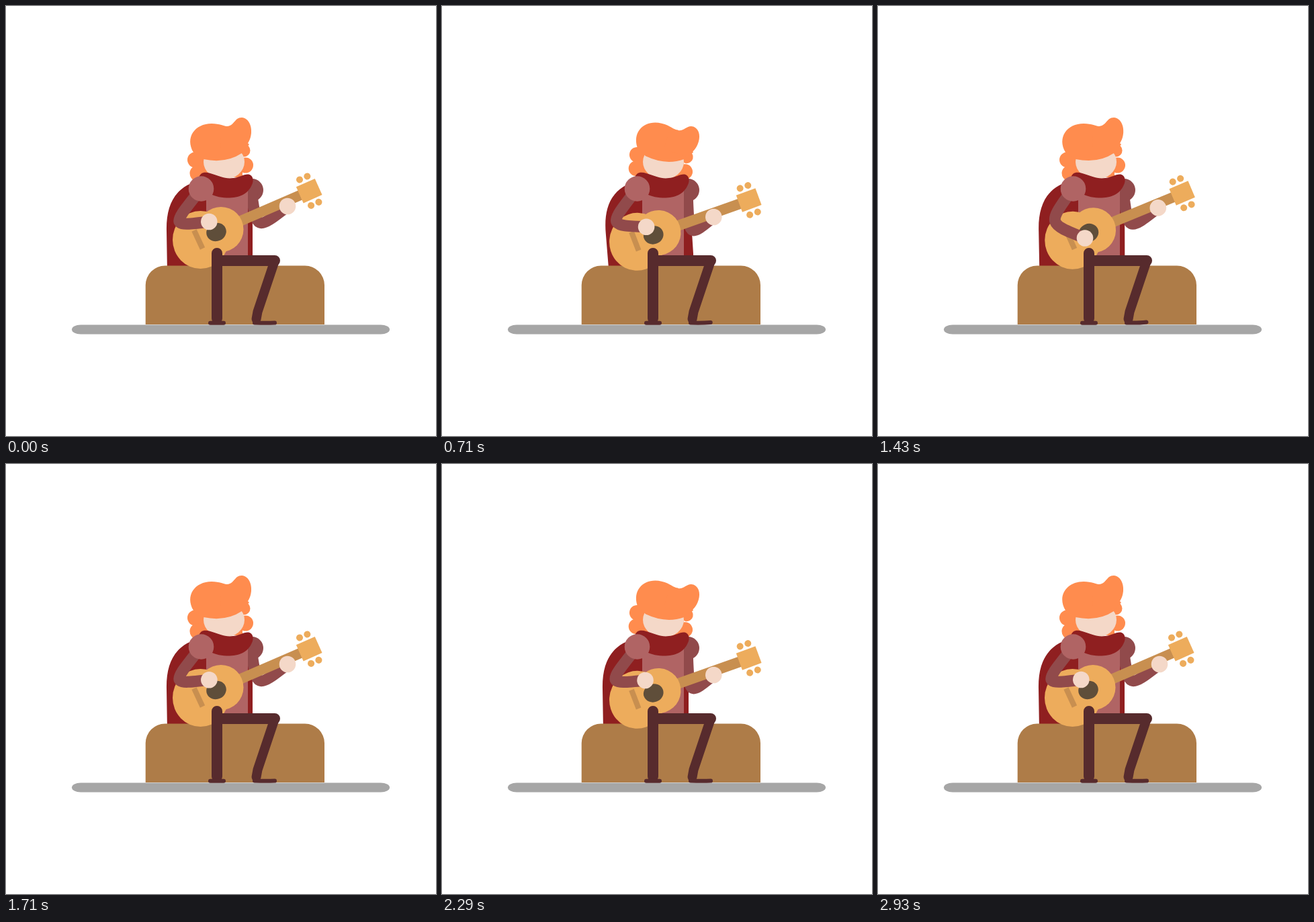
An HTML page that plays this animation: 640 by 640 pixels, repeating every 3 s.

```html
<!DOCTYPE html>
<html lang="en">
<head>
<meta charset="utf-8">
<title>Guitar player</title>
<style>
  html, body { margin: 0; width: 100%; height: 100%; overflow: hidden; background: #fff; }
  svg { display: block; width: 100%; height: 100%; }
  .line { fill: none; stroke-linecap: round; stroke-linejoin: round; }
  .red { fill: #8f1f20; }
  .rose { fill: #b06464; }
  .hair { fill: #ff8c4e; }
  .wood { fill: #edac5c; }
  .skin { fill: #f4d8c8; }
  .sleeve { stroke: #914a4b; stroke-width: 17; }
  .trousers { stroke: #572b2d; }
  .pegs { stroke: #edac5c; stroke-width: 10; stroke-dasharray: 0 12.4; }
  .dark-wood { stroke: #c88f50; fill: none; }
</style>
</head>
<body>
<svg viewBox="0 0 640 640">
  <rect x="98" y="474.5" width="473" height="14" rx="13" ry="7" fill="#a6a6a6"/>

  <path id="cape" class="red" d="M240 396L239 335C238 295 252 267 292 259H355Q367 285 367 330V396Z"/>
  <circle cx="366" cy="274" r="17" fill="#914a4b"/>
  <path id="farArm" class="line sleeve"/>
  <path class="rose" d="M298 262H360V390H298Z"/>
  <path d="M207.700 474V415.500A29 29 0 0 1 236.700 386.500H445A29 29 0 0 1 474 415.500V474Z" fill="#ae7c48"/>

  <g id="curls" class="hair">
    <path d="M285 210H352V255H285Z"/>
    <circle cx="281.500" cy="229" r="11.500"/>
    <circle cx="285" cy="249" r="11.500"/>
    <circle cx="354" cy="215" r="9.500"/>
    <circle cx="356.500" cy="237" r="11.500"/>
  </g>
  <ellipse id="face" class="skin" cx="324.500" cy="232" rx="30.500" ry="26"/>
  <g id="hair" class="hair">
    <path d="M279 218C266 196 281 175 306 175C320 175 325 180 332 179L362 206L351 219Q327 235 294 228Z"/>
    <path id="quiff" d="M318 178C342 184 337 166 351 166C361 167 366 178 365 189C364 200 360 203 356 212H320Z"/>
  </g>
  <path class="red" d="M287 257C288 248 295 246 304 249C317 253 327 258 338 256C349 255 353 250 361 250.500
    C368 252 369 260 366 266C360 281 345 286 328 285.500C308 285 290 275 287 257Z"/>

  <g id="guitar">
    <path class="dark-wood" stroke-width="15.500" d="M335 326L438 281.500"/>
    <ellipse class="wood" cx="289.500" cy="348" rx="41.500" ry="43"/>
    <circle class="wood" cx="320" cy="332.500" r="33.500"/>
    <ellipse cx="313" cy="336.500" rx="15" ry="13.500" transform="rotate(-24 313 336.500)" fill="#5f4e3a"/>
    <path class="dark-wood" stroke-width="8" d="M280 334L292.500 361"/>
    <g transform="translate(451.200 275.200) rotate(-24)">
      <rect class="wood" x="-15.250" y="-13.250" width="30.500" height="26.500"/>
      <path class="line pegs" d="M-6.200 -21h12.500M-6.200 21h12.500"/>
    </g>
  </g>

  <circle id="farHand" class="skin" r="12.300"/>
  <path id="nearArm" class="line sleeve"/>
  <circle class="rose" cx="290.500" cy="272" r="18.800"/>
  <circle id="nearHand" class="skin" r="12.300"/>

  <g class="line trousers">
    <path stroke-width="16" d="M314 368V465M318 379H400"/>
    <path stroke-width="14" d="M400 379L374.500 455L372.500 466"/>
    <path stroke-width="6" d="M304 471.700H324"/>
    <path id="foot" stroke-width="6"/>
  </g>
</svg>
<script>
const LOOP = 3000, FRAMES = 42;
const byId = id => document.getElementById(id);
const linear = x => x;
const smooth = x => x * x * (3 - 2 * x);
const easeOut = x => 1 - (1 - x) ** 2;

const cycle = (p, count) => (p * count) % 1;
const ramp = (p, from, to, ease) => ease(Math.min(1, Math.max(0, (p - from) / (to - from))));
const mix = (a, b, k) => a.map((v, i) => v + (b[i] - v) * k);

// Goes from 0 to 1, holds, and returns to 0 within one cycle.
function pulse(p, rise, top, fall, end, easeIn = smooth, easeBack = easeIn) {
  return ramp(p, rise, top, easeIn) - ramp(p, fall, end, easeBack);
}

function move(id, transform) {
  byId(id).setAttribute('transform', transform);
}

function drawArm(side, shoulder, elbow, hand) {
  byId(side + 'Arm').setAttribute('d', `M${shoulder}C${elbow} ${elbow} ${hand}`);
  move(side + 'Hand', `translate(${hand})`);
}

function draw(p) {
  const sway = cycle(p, 2);
  const tilt = pulse(sway, .2, .4, .9, 1, linear);
  const slide = pulse(sway, .2, .4, .9, 1);
  const nod = pulse(sway, .25, .4, .72, 1, smooth, easeOut);
  const swing = pulse(p, .1, .25, .4, .5);
  const strum = pulse(cycle(p, 5), .1, .42, .55, .95);
  const tap = 5.5 * pulse(cycle(p, 4), .5, .75, .75, 1, linear);

  move('guitar', `rotate(${3.8 * tilt} 247 365)`);
  move('cape', `rotate(${-3.7 * swing} 300 262)`);
  for (const id of ['curls', 'hair']) move(id, `rotate(${13.5 * nod} 318 263)`);
  move('quiff', `rotate(${6 * nod} 325 195)`);
  move('face', `translate(${5 * nod} 0)`);

  drawArm('far', [365, 276], mix([373, 334], [367, 345], slide), mix([419, 298], [404.3, 314], slide));
  drawArm('near', [285, 279], mix([246, 328], [253, 324], strum), mix([302.3, 321], [308, 345.5], strum));
  byId('foot').setAttribute('d', `M370 471.500Q388 472 ${400 - tap / 2} ${471.5 - tap}`);
}

function tick(now) {
  const frame = Math.floor((now % LOOP + 5) * FRAMES / LOOP) % FRAMES;
  draw(frame / (FRAMES - 1) % 1);
  requestAnimationFrame(tick);
}

draw(0);
requestAnimationFrame(tick);
</script>
</body>
</html>
```
